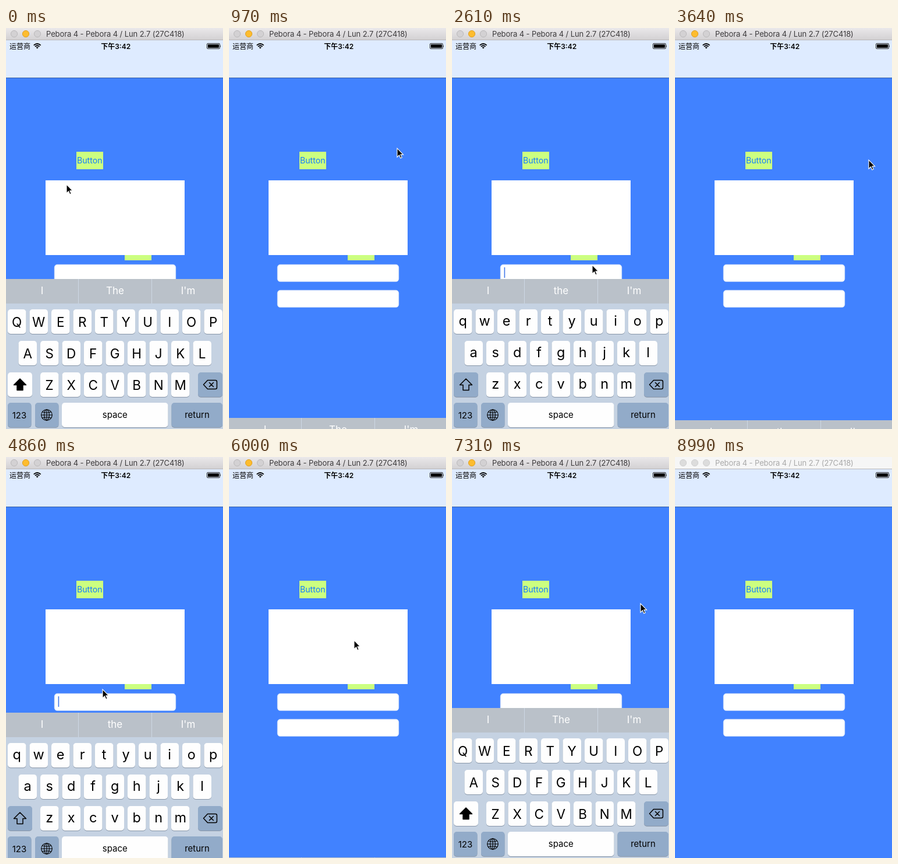
Recreate the animation shown at these times as an HTML page. Size 373 by 687 pixels, loop 9030 ms.

```html
<!DOCTYPE html>
<html lang="en">
<head>
<meta charset="utf-8">
<title>Keyboard dismissal</title>
<style>
  html, body { margin: 0; width: 100%; height: 100%; overflow: hidden; background: #4182ff; }
  svg { display: block; width: 100%; height: 100%; }
  text { font-family: Inter, Roboto, "Noto Sans", sans-serif; }
  .cjk { font-family: Inter, "Noto Sans CJK SC", "Noto Sans CJK", sans-serif; font-size: 12px; }
  .mid { text-anchor: middle; }
  .title { font-size: 13px; letter-spacing: -.1px; fill: #3c3a3c; }
  .dot { fill: #d3d1d3; stroke: #bbb9bb; }
  .away .bar { fill: #f6f6f6; }
  .away .title { fill: #a9a9a9; }
  .away .dot { fill: #dcdcdc; stroke: #d0d0d0; }
  .amber { fill: #fdbc2e; stroke: #dfa023; }
  .away .amber { fill: #dcdcdc; stroke: #d0d0d0; }
  .hint { font-size: 17px; fill: #fff; }
  .upper { font-size: 22.5px; }
  .lower { font-size: 23.5px; }
  .word { font-size: 15px; }
  .icon { fill: none; stroke: #000; stroke-width: 1.5; stroke-linejoin: round; stroke-linecap: round; }
</style>
</head>
<body>
<svg viewBox="0 0 373 687" preserveAspectRatio="none">
  <defs>
    <linearGradient id="chrome" x2="0" y2="1">
      <stop stop-color="#eae8ea"/><stop offset="1" stop-color="#d2d0d2"/>
    </linearGradient>
  </defs>

  <rect width="373" height="687" fill="#4182ff"/>
  <rect y="21" width="373" height="64" fill="#deebff"/>
  <rect y="85" width="373" height="1" fill="#365f9f"/>

  <!-- status bar -->
  <text class="cjk" x="6" y="35.5">运营商</text>
  <g fill="none" stroke="#000" stroke-width="1.8">
    <path d="M47.7 29.6Q53.7 24.4 59.7 29.6M49.9 31.9Q53.7 28.6 57.5 31.9"/>
    <path d="M51.6 33.2Q53.7 31.6 55.8 33.2L53.7 35.6Z" fill="#000" stroke="none"/>
  </g>
  <text class="cjk mid" x="188.7" y="35.5" font-weight="600">下午3:42</text>
  <rect x="345.5" y="26.5" width="22" height="9" rx="1.5" fill="none" stroke="#222"/>
  <rect x="347" y="28" width="19" height="6" fill="#000"/>
  <path d="M368.3 29.5q1.7 1.5 0 3.2z"/>

  <!-- page -->
  <rect x="121" y="212" width="46" height="30" fill="#ccff80"/>
  <text class="mid" x="143.8" y="232" font-size="14.2" fill="#157efb">Button</text>
  <rect x="204" y="368" width="46" height="30" fill="#ccff80"/>
  <rect x="68" y="261" width="239" height="128" fill="#fff"/>
  <g fill="#fff" stroke="#d3e0f5" stroke-width=".6">
    <rect x="83.2" y="405.2" width="208.6" height="29.4" rx="5"/>
    <rect x="83.2" y="449.2" width="208.6" height="29.4" rx="5"/>
  </g>
  <rect id="caret" width="1.6" height="18" fill="#4278e8"/>

  <g id="board"></g>

  <g id="chromeBar">
    <rect class="bar" width="373" height="21" fill="url(#chrome)"/>
    <rect y="20" width="373" height="1" fill="#b9b7b9"/>
    <circle class="dot" cx="14" cy="10" r="5.6"/>
    <circle class="amber" cx="34" cy="10" r="5.6"/>
    <circle class="dot" cx="54" cy="10" r="5.6"/>
    <text class="title" x="69" y="15">Pebora 4 - Pebora 4 / Lun 2.7 (27C418)</text>
  </g>

  <path id="pointer" d="M1 1V16.2L4.6 12.8L6.8 18L9.2 17L7 11.9H11.6Z" fill="#000" stroke="#fff" stroke-width="1.1"/>
</svg>
<script>
const LOOP = 9030, AWAY = 8990, TOP = 430, DROP = 257;
const $ = id => document.getElementById(id);

/* ---- keyboard drawing ---- */
const key = (x, y, w, fill) =>
  `<rect x="${x}" y="${y + 1}" width="${w}" height="42" rx="5" fill="#8896a8"/>` +
  `<rect x="${x}" y="${y}" width="${w}" height="42" rx="5" fill="${fill}"/>`;
const label = (cls, x, y, s) => `<text class="mid ${cls}" x="${x}" y="${y}">${s}</text>`;
const WHITE = '#fefefe', SLATE = '#92abc9';
const ROWS = [['QWERTYUIOP', 18.7, 52], ['ASDFGHJKL', 37.2, 106], ['ZXCVBNM', 74.7, 160]];

function letters(upper) {
  const cls = upper ? 'upper' : 'lower';
  let out = label('hint', 62, 25.5, 'I') +
    label('hint', 187.5, 25.5, upper ? 'The' : 'the') +
    label('hint', 313, 25.5, "I'm");
  for (const [row, x0, y] of ROWS)
    [...row].forEach((c, i) => {
      out += label(cls, x0 + i * 37.5, y + (upper ? 29.5 : 28), upper ? c : c.toLowerCase());
    });
  return out + key(3, 160, 42, upper ? WHITE : SLATE) +
    `<path class="icon" ${upper ? 'style="fill:#000"' : ''}
      d="M24 171L34.5 181.5H29V190.5H19V181.5H13.5Z"/>`;
}

function board() {
  let out = `<rect width="373" height="${DROP}" fill="#c5d2e2"/>
    <rect width="373" height="42" fill="#bac1c9"/>
    <path d="M124.5 0V42M250.5 0V42" stroke="#cdd7e4"/>`;
  for (const [row, x0, y] of ROWS)
    for (let i = 0; i < row.length; i++) out += key(x0 - 15.7 + i * 37.5, y, 31.5, WHITE);
  out += key(330, 160, 42, SLATE) + key(3, 212, 40.5, SLATE) + key(50, 212, 40.5, SLATE) +
    key(96, 212, 182.5, WHITE) + key(284.5, 212, 87.5, SLATE);
  out += label('word', 23, 238.5, '123') + label('word', 187.3, 238, 'space') +
    label('word', 328.5, 238, 'return');
  out += `<path class="icon" d="M339.5 181L346.5 173.5H360Q362.5 173.5 362.5 176V186Q362.5 188.5 360 188.5H346.5Z
      M349.5 177.5L356.5 184.5M356.5 177.5L349.5 184.5"/>
    <g class="icon" style="stroke-width:1.1"><circle cx="70" cy="233" r="9.3"/><ellipse cx="70" cy="233" rx="4.4" ry="9.3"/>
    <path d="M70 223.7V242.3M60.7 233H79.3M62.6 227.8Q70 230.6 77.4 227.8M62.6 238.2Q70 235.4 77.4 238.2"/></g>`;
  return out + `<g id="caps">${letters(true)}</g><g id="small">${letters(false)}</g>`;
}
$('board').innerHTML = board();

/* ---- timeline ---- */
// editing sessions: focus time, resign time, capitals, caret place
const BOX = [72, 269], FIELD = [89.6, 410];
const SESSIONS = [
  { on: -2000, off: 760, caps: true, at: BOX, blink: 200 },
  { on: 2165, off: 3416, caps: false, at: FIELD },
  { on: 4600, off: 5588, caps: false, at: FIELD },
  { on: 6630, off: 7560, caps: true, at: BOX }
];

// pointer stops: time, x, y
const PATH = [
  [0, 103, 267], [30, 103, 267], [150, 190, 208], [300, 278, 165], [460, 287, 196],
  [880, 287, 196], [1300, 297, 295], [1670, 275, 369], [1990, 231, 420],
  [2450, 231, 420], [3085, 308, 283], [3300, 332, 225],
  [3660, 332, 225], [4015, 234, 365], [4400, 203, 422],
  [4640, 203, 422], [4860, 165, 397], [5290, 185, 240],
  [5650, 185, 240], [6000, 214, 313], [6390, 200, 322],
  [6700, 200, 322], [7290, 323, 250], [7350, 323, 250], [7450, 321, 264],
  [7640, 321, 264], [8200, 390, 430], [LOOP, 390, 430]
];

const still = (a, b) => a[1] === b[1] && a[2] === b[2];

function slope(i, k) {
  const a = PATH[i - 1], p = PATH[i], b = PATH[i + 1];
  if (!a || !b || still(a, p) || still(p, b)) return 0;
  return (b[k] - a[k]) / (b[0] - a[0]);
}

function pointerAt(t) {
  let i = 0;
  while (i < PATH.length - 2 && PATH[i + 1][0] <= t) i++;
  const a = PATH[i], b = PATH[i + 1], d = b[0] - a[0], u = (t - a[0]) / d;
  const s = u * u * (3 - 2 * u);
  return [1, 2].map(k => a[k] + (b[k] - a[k]) * s +
    d * (slope(i, k) * u * (1 - u) ** 2 - slope(i + 1, k) * u * u * (1 - u)));
}

// critically damped spring, 0 to 1
function spring(ms) {
  if (ms <= 0) return 0;
  if (ms > 420) return 1;
  const x = ms * 0.0203;
  return 1 - (1 + x) * Math.exp(-x);
}

function caretAlpha(ms) {
  if (ms < 0) return 0;
  const p = ms % 1000;
  return Math.min(1, Math.max(0, (650 - p) / 100));
}

function draw(t) {
  const s = SESSIONS.filter(v => v.on <= t).pop();
  const shown = t < s.off ? spring(t - s.on) : 1 - spring(t - s.off);
  const y = Math.round(TOP + DROP * (1 - shown));
  $('board').setAttribute('transform', `translate(0 ${y})`);
  $('caps').style.display = s.caps ? '' : 'none';
  $('small').style.display = s.caps ? 'none' : '';

  const caret = $('caret');
  caret.setAttribute('x', s.at[0]);
  caret.setAttribute('y', s.at[1]);
  caret.setAttribute('opacity', t < s.off ? caretAlpha(t - (s.blink ?? s.on)) : 0);

  const [px, py] = pointerAt(t).map(Math.round);
  $('pointer').setAttribute('transform', `translate(${px} ${py})`);
  $('chromeBar').setAttribute('class', t >= AWAY ? 'away' : '');
}

const start = performance.now();
function tick() {
  draw((performance.now() - start) % LOOP);
  requestAnimationFrame(tick);
}
tick();
</script>
</body>
</html>
```
